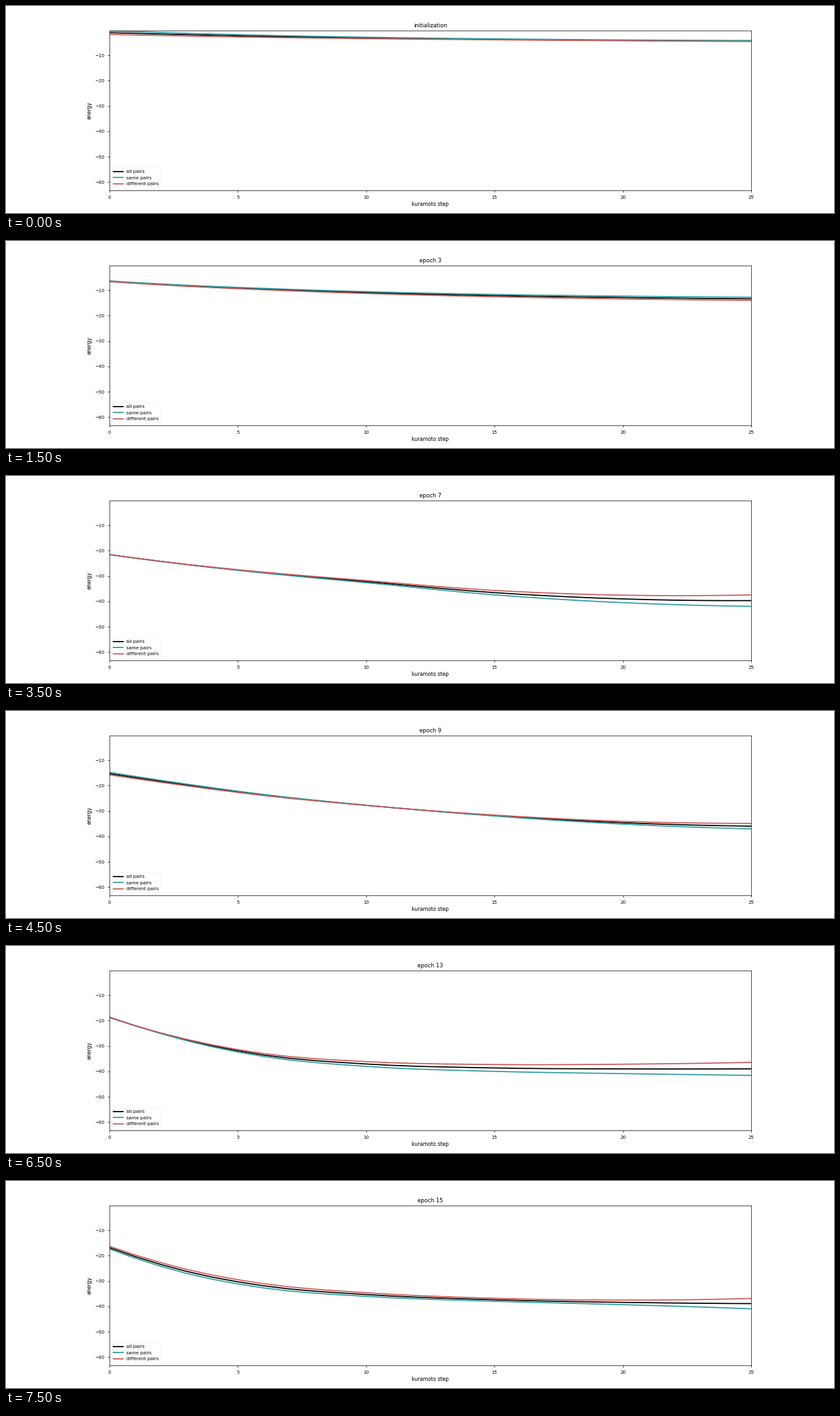
Animation, 1280 px wide and 320 px high, one loop 8000 ms. Source, as a matplotlib script:

```python
import numpy as np
import matplotlib.pyplot as plt
from matplotlib.animation import FuncAnimation

EPOCHS = 16
STEPS = np.arange(26)
KNOTS = np.array([0, 3, 6, 10, 15, 20, 25], float)
GAP_KNOTS = [0, 5, 15, 25]

# epoch: (mean energy at KNOTS, half the same/different gap at GAP_KNOTS)
ANCHORS = {
    0: ([-1.07, -1.85, -2.5, -3.15, -3.7, -4.1, -4.35], [.7, .45, .19, .2]),
    3: ([-6.45, -8.21, -9.51, -10.89, -12.09, -12.85, -13.36], [.15, .25, .46, .62]),
    5: ([-12.57, -14.13, -15.43, -16.83, -18.0, -18.46, -18.41], [0, -.08, -.16, -.43]),
    7: ([-21.55, -25.45, -28.64, -32.2, -36.55, -39.02, -39.69], [0, -.13, -.87, -2.25]),
    9: ([-15.25, -19.71, -23.67, -27.75, -31.78, -34.61, -35.96], [.5, .25, -.19, -1.08]),
    13: ([-18.69, -27.62, -33.54, -37.08, -38.64, -39.02, -39.0], [.13, -.48, -1.35, -2.57]),
    15: ([-16.83, -26.19, -31.88, -35.33, -37.39, -38.41, -38.9], [-.53, -.83, -.59, -2.05]),
}
# Epochs in between: (first, last) mean energy; the shape is blended.
ENDS = {
    1: (-2.3, -6.2), 2: (-3.8, -6.1), 4: (-9.0, -13.4),
    6: (-16.5, -25.0), 8: (-20.0, -43.4), 10: (-10.0, -22.4),
    11: (-9.6, -21.6), 12: (-13.5, -34.0), 14: (-17.6, -38.9),
}


def hermite(values):
    """Smooth curve through KNOTS, sampled at every step."""
    y = np.array(values)
    m = np.gradient(y, KNOTS, edge_order=2)
    i = np.clip(np.searchsorted(KNOTS, STEPS, side="right") - 1, 0, len(KNOTS) - 2)
    h = KNOTS[i + 1] - KNOTS[i]
    t = (STEPS - KNOTS[i]) / h
    s = t * t * (3 - 2 * t)
    bend = h * (m[i] * t * (1 - t) ** 2 - m[i + 1] * t * t * (1 - t))
    return y[i] * (1 - s) + y[i + 1] * s + bend


def anchor(epoch):
    mean, gap = ANCHORS[epoch]
    return hermite(mean), np.polyval(np.polyfit(GAP_KNOTS, gap, 3), STEPS)


def curves(epoch):
    if epoch in ANCHORS:
        mean, gap = anchor(epoch)
    else:
        lo = max(e for e in ANCHORS if e < epoch)
        hi = min(e for e in ANCHORS if e > epoch)
        w = (epoch - lo) / (hi - lo)
        (m0, g0), (m1, g1) = anchor(lo), anchor(hi)
        unit = [(m - m[0]) / (m[-1] - m[0]) for m in (m0, m1)]
        first, last = ENDS[epoch]
        mean = first + (last - first) * ((1 - w) * unit[0] + w * unit[1])
        gap = (1 - w) * g0 + w * g1
    return mean, mean + gap, mean - gap


plt.rcParams.update({
    "font.family": "DejaVu Sans",
    "axes.labelsize": 8.8,
    "axes.titlesize": 9.6,
    "xtick.labelsize": 8,
    "ytick.labelsize": 8,
    "legend.fontsize": 8,
    "xtick.major.pad": 5.6,
    "ytick.major.pad": 5.6,
})

fig, ax = plt.subplots(figsize=(20, 5), dpi=64)
lines = [
    ax.plot(STEPS, np.zeros(26), color=color, lw=2, label=label)[0]
    for label, color in [("all pairs", "black"),
                         ("same pairs", "#2e9c9f"),
                         ("different pairs", "#cb5c5a")]
]
ax.set_xlim(0, 25)
ax.set_ylim(-63.2, -0.35)
ax.set_xticks(range(0, 26, 5))
ax.set_yticks(range(-60, 0, 10))
ax.set_xlabel("kuramoto step")
ax.set_ylabel("energy")
title = ax.set_title("initialization")
ax.legend(loc="lower left").get_frame().set_linewidth(0.24)


def update(epoch):
    for line, y in zip(lines, curves(epoch)):
        line.set_ydata(y)
    title.set_text(f"epoch {epoch}" if epoch else "initialization")
    return [*lines, title]


anim = FuncAnimation(fig, update, frames=EPOCHS, interval=500, repeat=True,
                     repeat_delay=0, blit=False)
plt.show()
```
